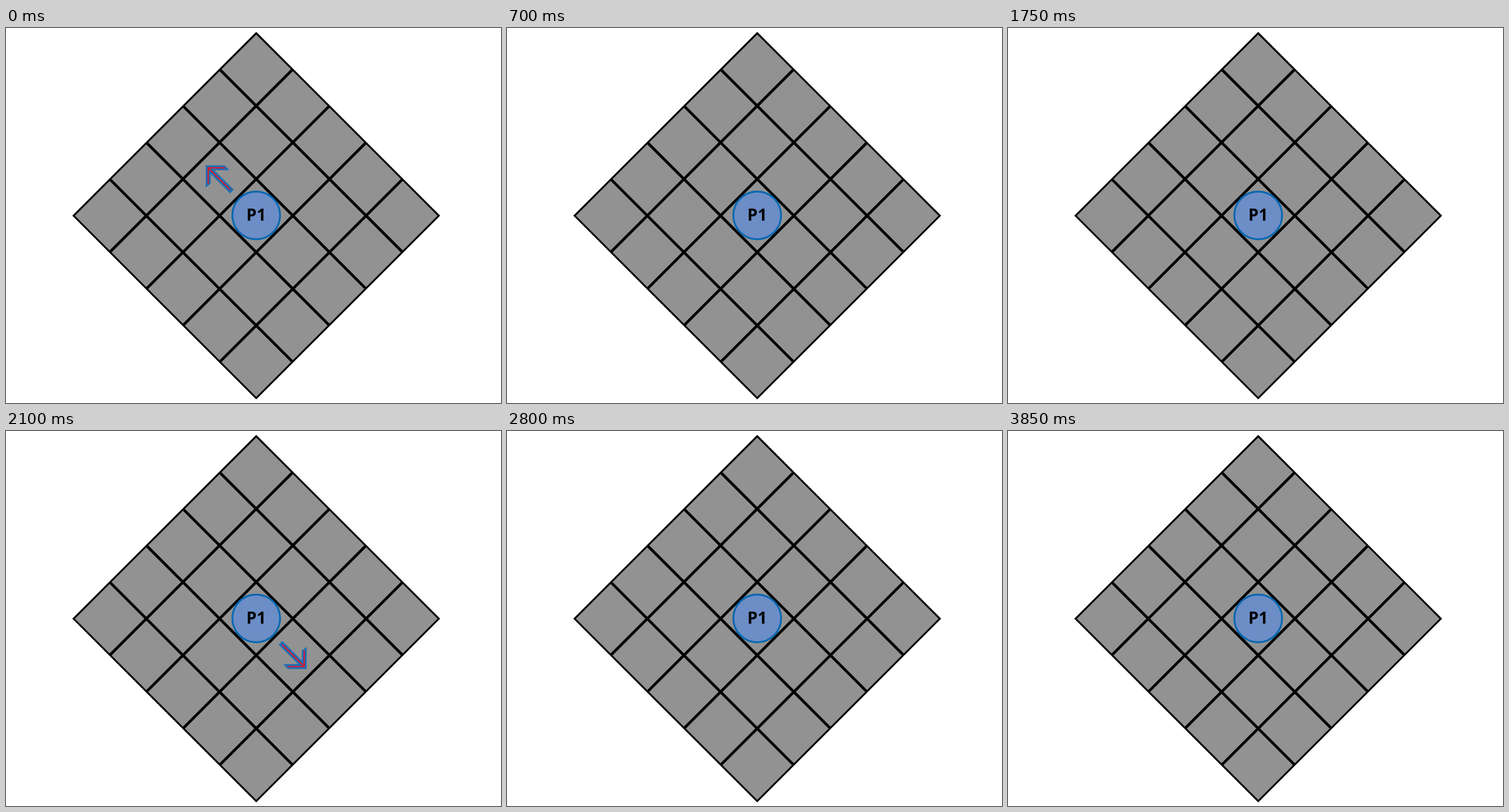
Write an HTML page that moves like this. It is 860 by 652 pixels and loops after 4200 ms.

```html
<!DOCTYPE html>
<html lang="en">
<head>
<meta charset="utf-8">
<title>Diagonal moves</title>
<style>
  html, body { margin: 0; width: 100%; height: 100%; overflow: hidden; background: #fff; }
  svg { display: block; width: 860px; height: 652px; }
  text { font: bold 28.5px "Open Sans", "Noto Sans", sans-serif; text-anchor: middle; }
</style>
</head>
<body>
<svg viewBox="0 0 860 652">
  <g transform="translate(434.7 326.3)">
    <path d="M0-317.3L317.3 0L0 317.3L-317.3 0Z" fill="#929292" stroke="#000" stroke-width="3.2"/>
    <path id="grid" fill="none" stroke="#000" stroke-width="4.8"/>
    <g id="arrow">
      <g transform="translate(-87.7 -87.5)">
        <path fill="#1c6fb4" d="M0 0H33L41 8.5H14.9L48.7 42.3L42.3 48.7L8.5 14.9V32L0 38.5Z"/>
        <path fill="none" stroke="#e0162b" stroke-width="2.2" d="M33.5 4.3H4.3V32M4.3 4.3L42.5 42.5"/>
      </g>
    </g>
    <g id="piece">
      <circle cy="-.5" r="41.5" fill="#6c8dc6" stroke="#0768b1" stroke-width="3.2"/>
      <text y="9">P1</text>
    </g>
  </g>
</svg>
<script>
  const STEP = 350;
  const SHIFT = 44.4;
  const CELL = 63.65;
  const DIRS = [[-1, -1], [1, -1], [1, 1], [-1, 1]];
  const get = id => document.getElementById(id);
  const arrow = get('arrow');
  const piece = get('piece');

  // Inner lines of the 5 x 5 board, both diagonals
  let d = '';
  for (let i = 1; i < 5; i++) {
    const a = i * CELL;
    const b = (5 - i) * CELL;
    d += `M${-a} ${-b}L${b} ${a}M${a} ${-b}L${-b} ${a}`;
  }
  get('grid').setAttribute('d', d);

  // Each direction: show arrow, move piece, return to centre
  function draw(now) {
    const step = Math.floor(now / STEP) % (DIRS.length * 3);
    const turn = Math.floor(step / 3);
    const phase = step % 3;
    const [x, y] = phase === 1 ? DIRS[turn] : [0, 0];
    arrow.setAttribute('visibility', phase === 2 ? 'hidden' : 'visible');
    arrow.setAttribute('transform', `rotate(${turn * 90})`);
    piece.setAttribute('transform', `translate(${x * SHIFT} ${y * SHIFT})`);
  }

  const start = performance.now();
  function tick() {
    draw(performance.now() - start);
    requestAnimationFrame(tick);
  }
  tick();
</script>
</body>
</html>
```
